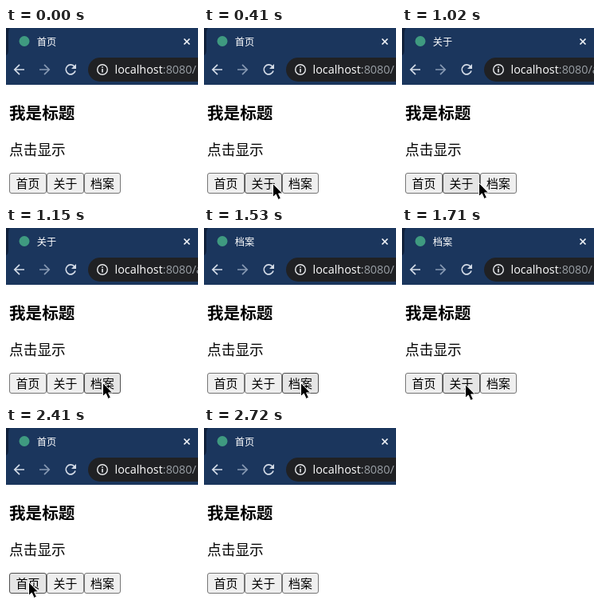
An HTML page that plays this animation: 241x215 px, repeating every 3.1 s.

```html
<!DOCTYPE html>
<html lang="zh-CN">
<head>
<meta charset="utf-8">
<style>
html, body { margin: 0; width: 100%; height: 100%; overflow: hidden; background: #fff; }
svg { display: block; width: 241px; height: 215px; }
text { font-family: "Noto Sans CJK SC", "Noto Sans CJK", "Noto Sans", sans-serif; white-space: pre; }
.url { font: 14.4px "Open Sans", "Noto Sans", sans-serif; fill: #fff; }
.url .dim { fill: #9aa0a6; }
.tab { font-size: 12.2px; fill: #fff; }
.btn rect { fill: #efefef; stroke: #767676; }
.btn text { font-size: 14.9px; }
.line { fill: none; stroke-width: 1.7; }

.cursor, .btn rect, .tab text, .path { animation: 3100ms step-end infinite; }
.cursor { animation-name: move; }
#home rect { animation-name: home-btn; }
#about rect { animation-name: about-btn; }
#files rect { animation-name: files-btn; }
.tab .home { animation-name: home-title; }
.tab .about { animation-name: about-title; }
.tab .files { animation-name: files-title; }
.path.about { animation-name: about-path; }

@keyframes move {
  0% { transform: translate(139px, 230px); }
  6.77% { transform: translate(138px, 207px); }
  8.38% { transform: translate(122px, 202px); }
  10% { transform: translate(104px, 198px); }
  11.93% { transform: translate(86px, 194px); }
  13.54% { transform: translate(75px, 193px); }
  15.16% { transform: translate(71px, 193px); }
  29.67% { transform: translate(74px, 193px); }
  31.29% { transform: translate(83px, 193px); }
  32.9% { transform: translate(96px, 193px); }
  34.51% { transform: translate(109px, 193px); }
  35.48% { transform: translate(118px, 193px); }
  37.09% { transform: translate(121px, 193px); }
  50.32% { transform: translate(119px, 194px); }
  51.93% { transform: translate(110px, 195px); }
  53.54% { transform: translate(96px, 195px); }
  55.16% { transform: translate(79px, 195px); }
  56.77% { transform: translate(61px, 194px); }
  58.06% { transform: translate(45px, 193px); }
  59.67% { transform: translate(33px, 192px); }
  61.29% { transform: translate(28px, 192px); }
  79.35% { transform: translate(35px, 193px); }
  80.64% { transform: translate(50px, 195px); }
  82.25% { transform: translate(78px, 198px); }
  83.54% { transform: translate(108px, 202px); }
  84.83% { transform: translate(138px, 206px); }
  86.45% { transform: translate(173px, 211px); }
  87.74%, 100% { transform: translate(190px, 230px); }
}
/* idle, hover and pressed looks */
@keyframes home-btn {
  0%, 68.7%, 82.25%, 100% { fill: #efefef; stroke: #767676; }
  58.06%, 68.7% { fill: #e5e5e5; stroke: #4f4f4f; }
  66.12% { fill: #f5f5f5; stroke: #8d8d8d; }
  82.25% { fill: #efefef; stroke: #767676; }
}
@keyframes about-btn {
  0%, 34.51%, 58.06%, 83.54%, 100% { fill: #efefef; stroke: #767676; }
  11.93%, 22.25%, 53.54%, 82.25% { fill: #e5e5e5; stroke: #4f4f4f; }
  20.64% { fill: #f5f5f5; stroke: #8d8d8d; }
}
@keyframes files-btn {
  0%, 11.93%, 53.54%, 86.45%, 100% { fill: #efefef; stroke: #767676; }
  8.38%, 34.51%, 44.51%, 83.54% { fill: #e5e5e5; stroke: #4f4f4f; }
  42.9% { fill: #f5f5f5; stroke: #8d8d8d; }
}
@keyframes home-title {
  0%, 68.7%, 100% { visibility: visible; }
  23.87% { visibility: hidden; }
}
@keyframes about-title {
  0%, 46.12%, 100% { visibility: hidden; }
  23.87% { visibility: visible; }
}
@keyframes files-title {
  0%, 68.7%, 100% { visibility: hidden; }
  46.12% { visibility: visible; }
}
@keyframes about-path {
  0%, 44.51%, 100% { visibility: hidden; }
  22.25% { visibility: visible; }
}
</style>
</head>
<body>
<svg viewBox="0 0 241 215">
  <rect width="241" height="215" fill="#fff"/>

  <!-- tab strip and toolbar -->
  <rect width="241" height="71" fill="#1b365d"/>
  <path d="M0 0H5Q3 2 3 7V27Q3 33 0 34Z" fill="#10203a"/>
  <circle cx="23" cy="16.5" r="6.5" fill="#3f9a80"/>
  <g class="tab">
    <text class="home" x="38.8" y="21.5">首页</text>
    <text class="about" x="38.8" y="21.5">关于</text>
    <text class="files" x="38.8" y="21.5">档案</text>
  </g>
  <path class="line" d="M223.5 13.5l7 7m0-7l-7 7" stroke="#f1f4f8"/>

  <path class="line" d="M23 52H11M17 45.8L10.8 52L17 58.2" stroke="#d3dbe7"/>
  <path class="line" d="M42 52H54M48 45.8L54.2 52L48 58.2" stroke="#8799b3"/>
  <path class="line" d="M86 48.2A6 6 0 1 0 87 53.5" stroke="#d3dbe7"/>
  <path d="M88 45V51H82Z" fill="#d3dbe7"/>

  <path d="M241 37H118a15 15 0 0 0 0 30H241Z" fill="#202124"/>
  <circle class="line" cx="121" cy="52" r="6.3" stroke="#e8eaed" style="stroke-width:1.4"/>
  <path d="M120.2 51h1.6v4.5h-1.6zM120.2 48.2h1.6v1.6h-1.6z" fill="#e8eaed"/>
  <text class="url" x="136.5" y="57">localhost<tspan class="dim">:8080/</tspan></text>
  <text class="url path about" x="238.7" y="57"><tspan class="dim">about</tspan></text>

  <!-- page -->
  <text x="4" y="114.3" font-size="20.6" font-weight="700">我是标题</text>
  <text x="4" y="158.6" font-size="17.7">点击显示</text>
  <g class="btn" id="home">
    <rect x="4.5" y="181.5" width="46" height="25" rx="2.5"/>
    <text x="12.5" y="199.8">首页</text>
  </g>
  <g class="btn" id="about">
    <rect x="51.5" y="181.5" width="46" height="25" rx="2.5"/>
    <text x="59.5" y="199.8">关于</text>
  </g>
  <g class="btn" id="files">
    <rect x="98.5" y="181.5" width="45" height="25" rx="2.5"/>
    <text x="106" y="199.8">档案</text>
  </g>

  <path class="cursor" d="M.5 .5V17.5L4.3 14L7.2 20.5L10.4 19L7.6 12.9H12.6Z" stroke="#fff" stroke-width="1"/>
</svg>
</body>
</html>
```
